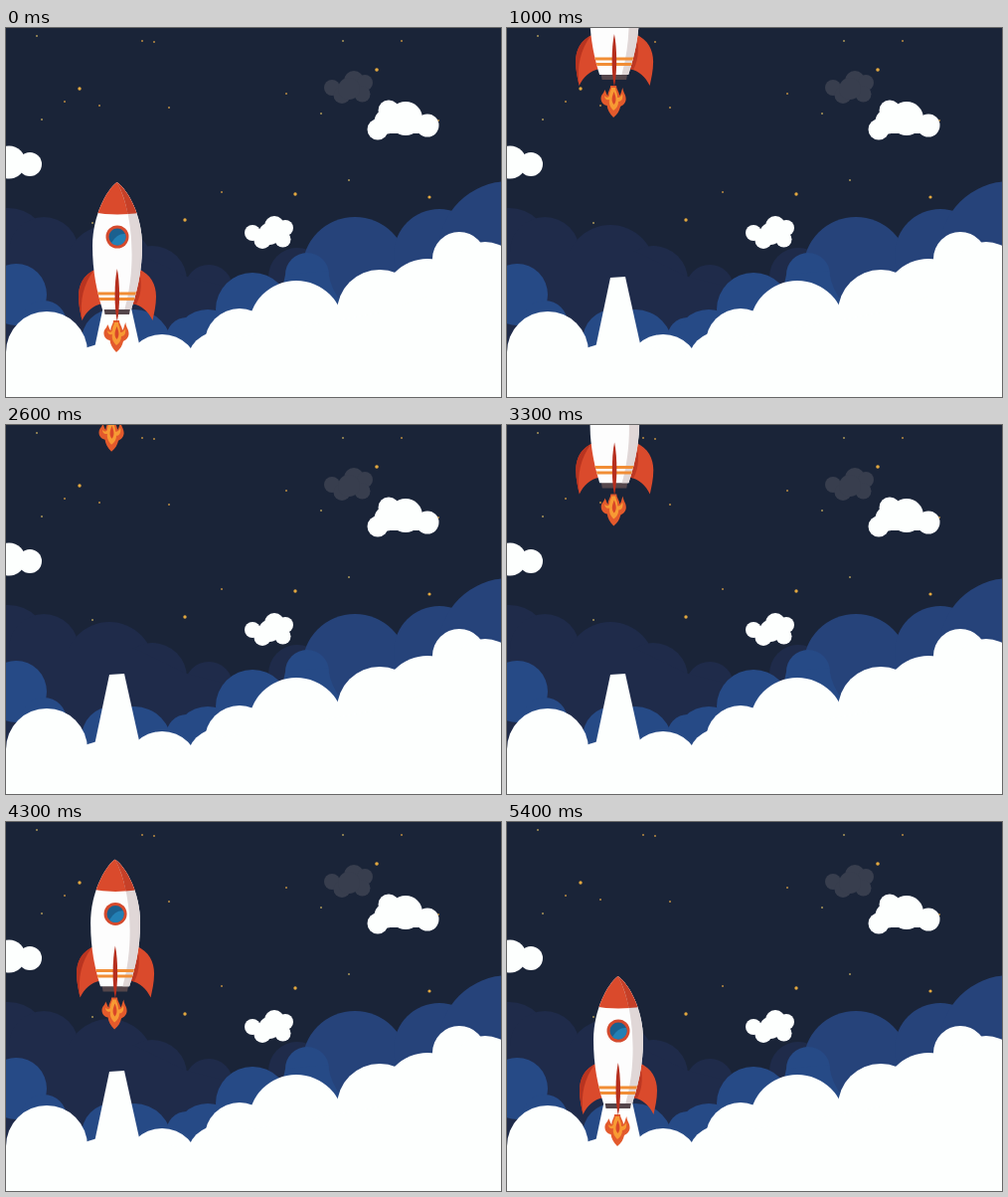
Recreate the animation shown at these times as an HTML page. Size 498x371 px, loop 5.5 s.

```html
<!DOCTYPE html>
<html lang="en">
<head>
<meta charset="utf-8">
<title>Rocket launch</title>
<style>
html, body { margin: 0; width: 100%; height: 100%; overflow: hidden; background: #1a2438; }
svg { display: block; width: 498px; height: 371px; }
</style>
</head>
<body>
<svg viewBox="0 0 498 371">
  <defs>
    <g id="puff">
      <circle cx="248" cy="206" r="8"/><circle cx="258" cy="213.500" r="8.500"/>
      <circle cx="270" cy="199" r="10"/><circle cx="281" cy="201" r="8"/>
      <circle cx="278.500" cy="212.500" r="8"/><circle cx="265" cy="207" r="11"/>
    </g>
    <clipPath id="hull">
      <path d="M111.500 155C123 163 137 189 137 219C137 246 131 267 126 283H97C92 267 87 246 87 219C87 189 101 163 111.500 155Z"/>
    </clipPath>
  </defs>

  <rect width="498" height="371" fill="#1a2438"/>
  <g id="stars"></g>

  <g fill="#1f2b4a">
    <circle cx="2" cy="222" r="41"/><circle cx="38" cy="225" r="35"/>
    <circle cx="104" cy="243" r="45"/><circle cx="147" cy="254" r="35"/>
    <circle cx="204" cy="262" r="24"/><circle cx="293" cy="250" r="29"/>
    <path d="M0 225H130L182 250L230 262V371H0Z"/>
  </g>
  <g fill="#26437a">
    <circle cx="351" cy="243" r="53"/><circle cx="436" cy="228" r="46"/>
    <circle cx="506" cy="225" r="71"/><path d="M310 245H498V300H310Z"/>
  </g>
  <g fill="#264a86">
    <circle cx="10" cy="268" r="31"/><circle cx="38" cy="297" r="23"/>
    <circle cx="107" cy="314" r="31"/><circle cx="129" cy="321" r="38"/>
    <circle cx="182" cy="312" r="21"/><circle cx="203" cy="317" r="34"/>
    <circle cx="248" cy="283" r="37"/><circle cx="303" cy="248" r="22"/>
    <path d="M281 248L324 244Q327 264 338 276V300H270Z"/>
  </g>

  <use href="#puff" x="80" y="-146" fill="#383e4e"/>
  <g fill="#fdfffe">
    <use href="#puff"/>
    <circle cx="3" cy="135" r="16.500"/><circle cx="24" cy="137" r="12"/>
    <circle cx="385" cy="83" r="10.500"/><circle cx="402" cy="91" r="17"/>
    <circle cx="424" cy="98" r="11.500"/><circle cx="374" cy="102" r="10.500"/>
    <circle cx="383" cy="94" r="12.500"/><path d="M376 95H424V106H376Z"/>
    <path d="M104 251L119 250L135 322H89Z"/>
    <circle cx="41" cy="326" r="41"/><circle cx="157" cy="345" r="37"/>
    <circle cx="214" cy="337" r="32"/><circle cx="235" cy="317" r="35"/>
    <circle cx="292" cy="302" r="48"/><circle cx="376" cy="286" r="43"/>
    <circle cx="424" cy="278" r="46"/><circle cx="456" cy="232" r="27"/>
    <circle cx="482" cy="250" r="35"/>
    <path d="M0 326H70L82 321L92 318H135L187 330L210 315L300 300L376 286L424 270L456 240H498V371H0Z"/>
  </g>

  <g id="rocket">
    <path fill="#da4a2c" d="M91 242C78 248 73 258 73 270C73 279 75 287 76.500 294C81 285 87 279 97 277Z"/>
    <path fill="#b93420" d="M88 244C77 249 73 259 73 270C73 279 75 287 76.500 294C74 273 78 258 88 244Z"/>
    <path fill="#da4a2c" d="M133 242C146 248 151 258 151 270C151 279 149 287 147.500 294C143 285 137 279 127 277Z"/>
    <path fill="#bd3823" d="M133 243C137 253 137 266 131 278L127 277Z"/>
    <path fill="#54464b" d="M98.500 282H125L124 288H99.500Z"/>
    <g clip-path="url(#hull)">
      <path fill="#fdfdfd" d="M86 154H138V284H86Z"/>
      <path fill="#da4a2c" d="M86 154H138V185Q112 190 86 185Z"/>
      <path fill="#e0d7d7" d="M111.500 155C126 180 133 235 119 284H140V154Z"/>
      <path fill="#c64028" d="M111.500 155Q119 168 122.500 187Q130 186.500 138 185V154Z"/>
      <path fill="#f18d35" d="M86 265.500H138V268.500H86ZM86 271H138V274H86Z"/>
    </g>
    <circle cx="112" cy="210" r="11.500" fill="#d54a2d"/>
    <circle cx="112" cy="210" r="8.500" fill="#1b608f"/>
    <path fill="#2380b5" d="M106 216A8.500 8.500 0 0 0 120 207Q112 206 106 216Z"/>
    <path fill="#e35a2c" d="M111 326C107 322 105 318 104.500 314C99 313 97 307 99.500 303C101 301 102 300 102 298C104 300 103.500 303 105.500 304C105 300 108 298 108 294H114C114 298 117 300 117 304C119 302 119 298 120.500 296C120 300 124 303 123.500 308C123 312 120 314 118 315C117 319 115 323 111 326Z"/>
    <path fill="#f79a34" d="M111 319C108 316 106 312 107 308C104 309 102 307 102 304C104 307 107 306 107 303C107 300 109 298 109 296H113C113 299 115 301 115 306C118 306 119 304 120 302C121 307 119 310 116 310C116 314 114 317 111 319Z"/>
    <path fill="#d94628" d="M111.500 313C108 309 110 304 111.500 300C113 304 115 309 111.500 313Z"/>
    <path fill="#b62f1e" d="M111.800 242C114.800 256 114.800 282 111.800 295C108.800 282 108.800 256 111.800 242Z"/>
  </g>
</svg>
<script>
const LOOP = 5500, TICK = 100, TOP = 342;
const UP = 1600, DOWN = 2200, LAND = 5400;
const rocket = document.getElementById('rocket');

// x, y, radius
const stars = [
  [31, 8, 1], [137, 13, 1], [149, 14, 1], [339, 13, 1], [398, 13, 1],
  [373, 42, 1.8], [74, 61, 1.7], [59, 74, 1], [94, 78, 1], [36, 92, 1],
  [164, 80, 1], [282, 66, 1], [317, 86, 1], [217, 165, 1], [291, 167, 1.7],
  [345, 153, 1], [426, 170, 1.6], [180, 193, 1.7], [87, 196, 1], [200, 251, 1],
  [435, 93, 1]
];
document.getElementById('stars').innerHTML = stars.map(([x, y, r], i) =>
  `<circle cx="${x}" cy="${y}" r="${r}" fill="${r > 1 ? '#e3a83f' : i % 3 ? '#b98a42' : '#a99458'}"/>`
).join('');

// Slowing climb, wait above the stage, steady descent
function height(t) {
  if (t < UP) {
    const s = t / 1000;
    return 273 * s - 37 * s * s;
  }
  if (t < DOWN) return TOP;
  return TOP * Math.max(0, (LAND - t) / (LAND - DOWN));
}

const start = performance.now();
function draw() {
  const now = Math.max(0, performance.now() - start) % LOOP;
  const h = height(Math.floor(now / TICK) * TICK);
  rocket.setAttribute('transform', `translate(${-h * 0.0165} ${-h})`);
  requestAnimationFrame(draw);
}
draw();
</script>
</body>
</html>
```
